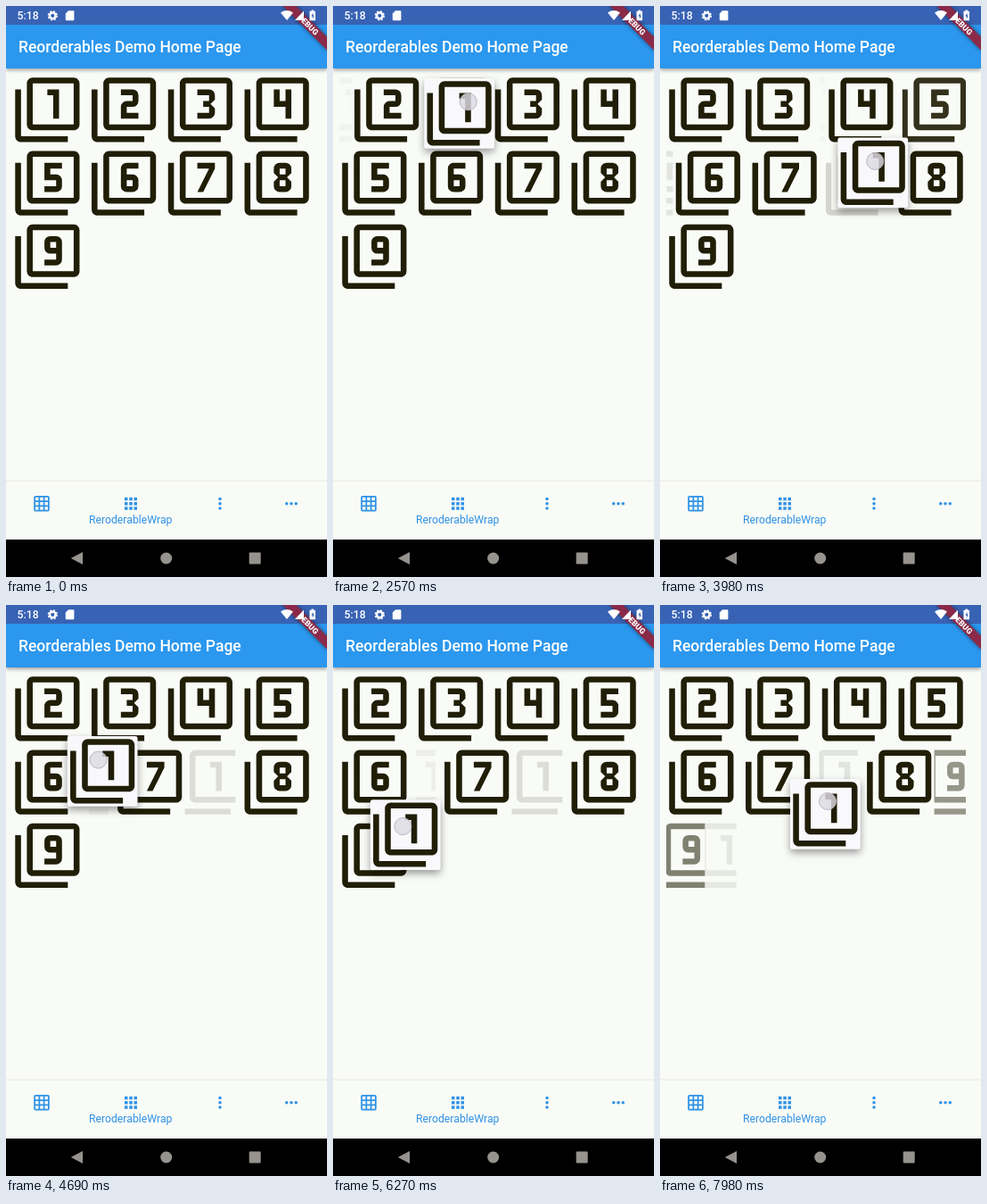
Animation of 360 by 640 pixels, one loop 8 s. Source, as an HTML page:

```html
<!DOCTYPE html>
<html lang="en">
<head>
<meta charset="utf-8">
<title>Reorderables Demo</title>
<style>
  html, body { margin: 0; width: 100%; height: 100%; overflow: hidden; background: #f9fbf7; }
  #stage { display: block; width: 100vw; height: 100vh; font-family: Roboto, sans-serif; }
  #bar { filter: drop-shadow(0 2px 2px rgba(0, 0, 0, .35)); }
  #sheet { filter: drop-shadow(0 4px 4px rgba(0, 0, 0, .38)); }
</style>
</head>
<body>
<svg id="stage" viewBox="0 0 360 640">
  <defs id="defs"></defs>
  <rect width="360" height="640" fill="#f9fbf7"/>
  <g id="wrap"></g>

  <g id="bar">
    <rect width="360" height="70" fill="#2b97ee"/>
  </g>
  <rect width="360" height="21" fill="#3862b4"/>
  <text x="14" y="52" font-size="17.5" font-weight="500" fill="#fff">Reorderables Demo Home Page</text>

  <g transform="translate(360 0) rotate(45)">
    <rect x="-35" y="24.5" width="70" height="10.5" fill="#8a2a48"
          style="filter: drop-shadow(0 0 2.5px rgba(0, 0, 0, .5))"/>
    <text y="32.9" font-size="8.9" font-weight="900" fill="#fff" text-anchor="middle">DEBUG</text>
  </g>

  <g fill="#fff">
    <text x="12.5" y="15.2" font-size="12.25" font-weight="500">5:18</text>
    <g fill="none" stroke="#fff">
      <circle cx="52.3" cy="10.8" r="3.3" stroke-width="2.4"/>
      <circle cx="52.3" cy="10.8" r="4.9" stroke-width="1.6" stroke-dasharray="2.2 1.65"/>
    </g>
    <path d="M70 5.3h5.4a1 1 0 0 1 1 1v8.9a1 1 0 0 1-1 1h-7.6a1 1 0 0 1-1-1v-6.700z"/>
    <path d="M315 16 308 7.400Q315 2.600 322 7.400Z"/>
    <path d="M324 16h10V5.500z"/>
    <path d="M342.500 4.500h2.500v1.300h2v10.400h-6.500v-10.400h2z"/>
  </g>
  <path d="M344.400 7.500l-2 4h1.400v3l2-4h-1.400z" fill="#3862b4"/>

  <rect y="531.5" width="360" height="1.5" fill="#efeee2"/>
  <g id="tabs" fill="#2f92e6"></g>
  <text x="139.700" y="579.500" font-size="12.25" fill="#2f92e6" text-anchor="middle">ReroderableWrap</text>

  <rect y="598" width="360" height="42" fill="#000"/>
  <g fill="#96938f">
    <path d="M72.800 619 86 612v14z"/>
    <circle cx="179.700" cy="619" r="6.500"/>
    <rect x="272.700" y="612.500" width="13" height="13" rx="1"/>
  </g>

  <g id="card">
    <rect id="sheet" width="78.75" height="78.75" rx="2.500" fill="#f9f8fb"/>
    <svg width="78.75" height="78.75" viewBox="0 0 24 24"><use href="#n1"/></svg>
  </g>
  <circle id="touch" r="9.500" fill="#dddbe2" fill-opacity=".82" stroke="#b9b6c0" stroke-width="1"/>
</svg>

<script>
const LOOP = 8000, SIZE = 78.75, GAP = 7, PITCH = SIZE + GAP, ROW = 82.25, LEFT = 7, TOP = 77;
const TOUCH = 1000, LIFT = 1500, SHIFT = 200, LAG = 33;
const GHOST = .18, INK = '#201e06';
const NS = 'http://www.w3.org/2000/svg';
const $ = id => document.getElementById(id);
const clamp = v => Math.max(0, Math.min(1, v));

function add(parent, name, attrs) {
  const el = document.createElementNS(NS, name);
  for (const key in attrs) el.setAttribute(key, attrs[key]);
  return parent.appendChild(el);
}

// Icons on a 24 unit grid
const FRAME = 'M3 5H1v16c0 1.1.9 2 2 2h16v-2H3zM21 1H7c-1.1 0-2 .9-2 2v14c0 1.1.9 2 2 2h14' +
  'c1.1 0 2-.9 2-2V3c0-1.1-.9-2-2-2zm0 16H7V3h14z';
const DIGITS = [
  'M14 15h2V5h-4v2h2z',
  'M17 13h-4v-2h2a2 2 0 0 0 2-2V7a2 2 0 0 0-2-2h-4v2h4v2h-2a2 2 0 0 0-2 2v4h6z',
  'M17 13v-1.5L15.500 10 17 8.500V7a2 2 0 0 0-2-2h-4v2h4v2h-2v2h2v2h-4v2h4a2 2 0 0 0 2-2z',
  'M15 15h2V5h-2v4h-2V5h-2v6h4z',
  'M17 13v-2a2 2 0 0 0-2-2h-2V7h4V5h-6v6h4v2h-4v2h4a2 2 0 0 0 2-2z',
  'M13 15h2a2 2 0 0 0 2-2v-2a2 2 0 0 0-2-2h-2V7h4V5h-4a2 2 0 0 0-2 2v6a2 2 0 0 0 2 2zm0-4h2v2h-2z',
  'M13 15l4-8V5h-6v2h4l-4 8z',
  'M13 15h2a2 2 0 0 0 2-2v-1.500L15.500 10 17 8.500V7a2 2 0 0 0-2-2h-2a2 2 0 0 0-2 2v1.500L12.500 10 11 11.500V13' +
    'a2 2 0 0 0 2 2zm0-8h2v2h-2zm0 4h2v2h-2z',
  'M15 5h-2a2 2 0 0 0-2 2v2a2 2 0 0 0 2 2h2v2h-4v2h4a2 2 0 0 0 2-2V7a2 2 0 0 0-2-2zm0 4h-2V7h2z'
];
DIGITS.forEach((d, i) =>
  add($('defs'), 'path', { id: 'n' + (i + 1), d: FRAME + d, fill: INK, 'fill-rule': 'evenodd' }));

// Bottom tabs
function tab(x, shape, attrs) {
  const g = add($('tabs'), 'g', { transform: `translate(${x - 10.5} 547.3) scale(.875)` });
  shape(g);
}
const three = [0, 1, 2];
tab(40, g => {
  add(g, 'rect', { x: 3, y: 3, width: 18, height: 18, rx: 1, fill: 'none', stroke: '#2f92e6', 'stroke-width': 2 });
  add(g, 'path', { d: 'M9 3v18M15 3v18M3 9h18M3 15h18', stroke: '#2f92e6', 'stroke-width': 2 });
});
tab(140, g => three.forEach(r => three.forEach(c =>
  add(g, 'rect', { x: 4 + 6 * c, y: 4 + 6 * r, width: 4, height: 4 }))));
tab(240, g => three.forEach(i => add(g, 'circle', { cx: 12, cy: 6 + 6 * i, r: 2 })));
tab(320, g => three.forEach(i => add(g, 'circle', { cx: 6 + 6 * i, cy: 12, r: 2 })));

// Two views per tile: one arriving (or at rest), one leaving
const tiles = DIGITS.map((_, i) => [0, 1].map(() => {
  const view = add($('wrap'), 'svg', { height: SIZE });
  add(view, 'use', { href: '#n' + (i + 1) });
  return view;
}));

// Tile cropped around its centre to the given share of its width
function place(view, x, row, share, alpha) {
  if (share <= 0) return;
  const w = 24 * share;
  view.setAttribute('x', x);
  view.setAttribute('y', TOP + ROW * row);
  view.setAttribute('width', SIZE * share);
  view.setAttribute('viewBox', `${12 - w / 2} 0 ${w} 24`);
  view.setAttribute('opacity', alpha);
  view.style.display = '';
}

// Reorder steps: start time, slot left, slot taken
const MOVES = [
  [2406, 0, 1], [2990, 1, 2], [3800, 2, 6], [4635, 6, 5],
  [5580, 5, 6], [6215, 6, 5], [6430, 5, 8], [7871, 8, 6]
];

// Card position: time, x, y
const PATH = [
  [2060, 7, 77], [2300, 25, 78], [2450, 57, 79], [2570, 102, 81], [2700, 124, 88], [2870, 128, 97],
  [3000, 142, 96], [3150, 180, 93], [3320, 199, 91], [3500, 199, 91],
  [3700, 200, 112], [3850, 200, 138], [4070, 199, 150], [4380, 199, 150],
  [4550, 138, 146], [4690, 69, 147], [4890, 40, 164], [5210, 40, 164],
  [5400, 90, 155], [5580, 180, 148], [5760, 248, 160], [6020, 170, 177],
  [6150, 96, 198], [6270, 42, 218], [6450, 22, 241], [6650, 15, 250], [7000, 15, 250],
  [7230, 40, 250], [7630, 40, 250], [7760, 78, 234], [7860, 130, 205], [7945, 146, 195]
];

function slope(i, axis) {
  const a = PATH[i - 1], b = PATH[i], c = PATH[i + 1];
  if (!a || !c) return 0;
  const p = (b[axis] - a[axis]) / (b[0] - a[0]), q = (c[axis] - b[axis]) / (c[0] - b[0]);
  return p * q > 0 ? 2 * p * q / (p + q) : 0;
}

function along(t, axis) {
  const i = PATH.findIndex(p => p[0] > t);
  if (i === 0) return PATH[0][axis];
  if (i < 0) return PATH[PATH.length - 1][axis];
  const a = PATH[i - 1], b = PATH[i], h = b[0] - a[0], u = (t - a[0]) / h, v = 1 - u;
  return a[axis] * v * v * (1 + 2 * u) + b[axis] * u * u * (1 + 2 * v) +
    h * u * v * (slope(i - 1, axis) * v - slope(i, axis) * u);
}

const slotX = i => LEFT + PITCH * (i % 4);
const rowOf = i => Math.floor(i / 4);

function layout(t) {
  tiles.flat().forEach(v => v.style.display = 'none');
  const order = DIGITS.map((_, i) => i);
  const started = MOVES.filter(m => m[0] <= t);
  const move = started.pop();
  for (const [, a, b] of started) order.splice(b, 0, order.splice(a, 1)[0]);

  const alpha = n => n === 0 && t >= LIFT ? GHOST : 1;
  const rest = i => place(tiles[order[i]][0], slotX(i), rowOf(i), 1, alpha(order[i]));
  if (!move) { order.forEach((_, i) => rest(i)); return; }

  const [start, a, b] = move, f = clamp((t - start) / SHIFT), lo = Math.min(a, b), hi = Math.max(a, b);
  const grow = (n, x, r) => place(tiles[n][0], x, r, f, f * alpha(n));
  const shrink = (n, x, r) => place(tiles[n][1], x, r, 1 - f, (1 - f) * alpha(n));

  order.forEach((_, i) => { if (i < lo || i > hi) rest(i); });
  for (let r = rowOf(lo); r <= rowOf(hi); r++) {
    const s = Math.max(lo, 4 * r), e = Math.min(hi, 4 * r + 3);
    if (b > a) {
      const dx = SIZE * (1 - f);
      shrink(order[s], slotX(s), r);
      for (let i = s + 1; i <= e; i++) place(tiles[order[i]][0], slotX(i - 1) + dx, r, 1, 1);
      grow(e === b ? 0 : order[e + 1], slotX(e) + dx, r);
    } else {
      const dx = SIZE * f;
      grow(s === b ? 0 : order[s - 1], slotX(s), r);
      for (let i = s; i < e; i++) place(tiles[order[i]][0], slotX(i) + dx + GAP, r, 1, 1);
      shrink(order[e], slotX(e) + dx, r);
    }
  }
}

function draw(t) {
  layout(t);
  $('card').style.display = t < LIFT ? 'none' : '';
  $('card').setAttribute('transform', `translate(${along(t, 1)} ${along(t, 2)})`);
  $('touch').style.display = t < TOUCH ? 'none' : '';
  $('touch').setAttribute('cx', along(t + LAG, 1) + 42);
  $('touch').setAttribute('cy', along(t + LAG, 2) + 25);
}

const begin = performance.now();
function tick() {
  draw((performance.now() - begin) % LOOP);
  requestAnimationFrame(tick);
}
tick();
</script>
</body>
</html>
```
